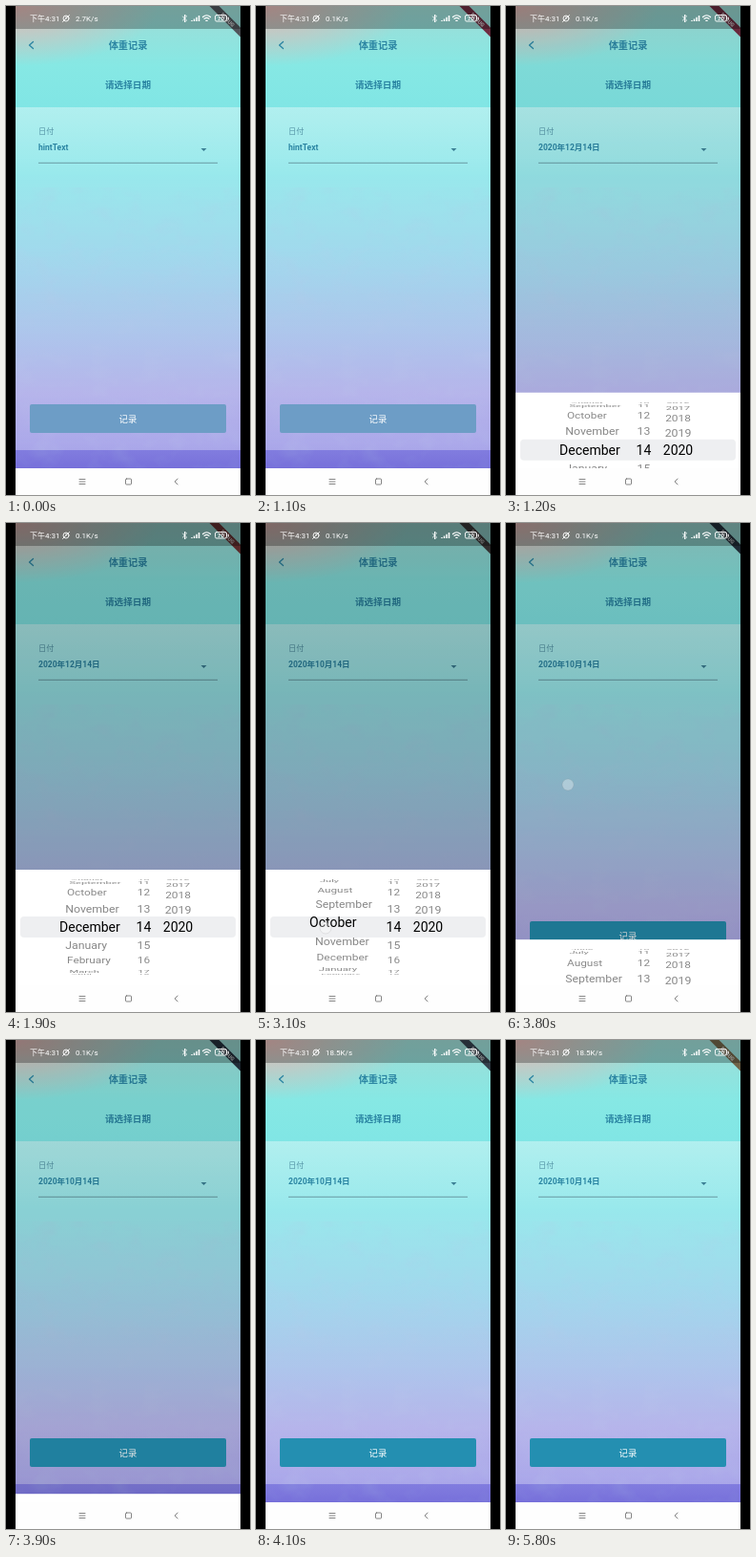
Write an HTML page that moves like this. It is 256 by 512 pixels and loops after 7.7 s.

```html
<!DOCTYPE html>
<html lang="zh">
<head>
<meta charset="utf-8">
<style>
html, body { margin: 0; width: 100%; height: 100%; overflow: hidden; background: #000; }
svg { display: block; width: 100%; height: 100%; font-family: Roboto, "Noto Sans CJK SC", "Noto Sans CJK", sans-serif; }
.mid { text-anchor: middle; }
.line { fill: none; stroke-linecap: round; stroke-linejoin: round; }
.bold { font-weight: 700; fill: #2a84a2; }
</style>
</head>
<body>
<svg viewBox="0 0 256 512">
  <defs>
    <linearGradient id="sky" x1="0" y1="0" x2="0" y2="1">
      <stop offset="0" stop-color="#9fdcd6"/>
      <stop offset=".13" stop-color="#86e8e4"/>
      <stop offset=".36" stop-color="#78e2e6"/>
      <stop offset=".54" stop-color="#80cbe6"/>
      <stop offset=".7" stop-color="#8cb0e4"/>
      <stop offset=".84" stop-color="#9694e2"/>
      <stop offset=".95" stop-color="#8480e0"/>
      <stop offset="1" stop-color="#7770da"/>
    </linearGradient>
    <radialGradient id="blush" gradientUnits="userSpaceOnUse" cx="10" cy="0" r="150" gradientTransform="scale(1 .42)">
      <stop offset="0" stop-color="#e2b8b4"/>
      <stop offset="1" stop-color="#e2b8b4" stop-opacity="0"/>
    </radialGradient>
    <linearGradient id="veil" x1="0" y1="0" x2="0" y2="1">
      <stop offset="0" stop-color="#fff" stop-opacity=".38"/>
      <stop offset=".2" stop-color="#fff" stop-opacity=".24"/>
      <stop offset="1" stop-color="#fff" stop-opacity=".32"/>
    </linearGradient>
    <filter id="paint" x="0" y="0" width="1" height="1">
      <feTurbulence type="fractalNoise" baseFrequency=".035 .05" numOctaves="3" seed="4"/>
      <feColorMatrix values="0 0 0 0 .35  0 0 0 0 .45  0 0 0 0 .75  .9 0 0 0 -.42"/>
    </filter>
    <clipPath id="phone"><path d="M10 0H246V512H10Z"/></clipPath>
    <clipPath id="wheels"><path d="M10 372H246V474H10Z"/></clipPath>
  </defs>
  <rect width="256" height="512"/>
  <g clip-path="url(#phone)">
    <rect x="10" width="236" height="484" fill="url(#sky)"/>
    <rect x="10" width="236" height="100" fill="url(#blush)"/>
    <rect x="10" y="190" width="236" height="294" filter="url(#paint)" opacity=".45"/>
    <rect x="10" y="106" width="236" height="359" fill="url(#veil)"/>

    <path class="line" d="M28.5 37.5L24.5 41L28.5 44.5" stroke="#2a84a2" stroke-width="1.3"/>
    <g class="mid bold">
      <text x="128" y="45" font-size="10.2">体重记录</text>
      <text x="128" y="85.6" font-size="9.6">请选择日期</text>
    </g>
    <text x="34" y="133.6" font-size="8.2" fill="#5594a6">日付</text>
    <text id="date" class="bold" x="34" y="151" font-size="8.5"></text>
    <path d="M34 164.3H222" stroke="#64939c" stroke-width=".9"/>
    <path d="M204.5 149H210.5L207.5 152Z" fill="#3b7f94"/>
    <rect id="button" x="25" y="417" width="206" height="30" rx="2"/>
    <text class="mid" x="128" y="436.2" font-size="9.4" font-weight="500" fill="#fff">记录</text>

    <g id="ribbon">
      <path d="M212.5 -1H222.5L247 23.5V33.5Z"/>
      <text class="mid" transform="translate(232.5 14.5) rotate(45)" y="2" font-size="5.6" font-weight="700" fill="#ddd">DEBUG</text>
    </g>
    <rect x="10" width="236" height="24" fill="#000" fill-opacity=".28"/>
    <rect id="scrim" x="10" width="236" height="484"/>

    <g fill="#fff" font-size="8">
      <text x="25" y="16">下午4:31</text>
      <text id="speed" x="73" y="16"></text>
    </g>
    <g class="line" stroke="#fff" stroke-width=".9">
      <circle cx="63" cy="13" r="3"/>
      <path d="M59.5 16.5L66.5 9.5M63 11V13.3"/>
      <path d="M185.5 11L189.5 15L187.5 17V9L189.5 11L185.5 15"/>
      <path d="M195 15V16M197.5 13.5V16M200 11.8V16M202.5 10V16" stroke-width="1.5" stroke-linecap="butt"/>
      <path d="M206.5 11.5Q210.5 8 214.5 11.5M208 13.4Q210.5 11.2 213 13.4M209.8 15.3H211.2" stroke-width="1.2"/>
      <rect x="219.5" y="9.5" width="12" height="6.5" rx="1.5"/>
      <path d="M233.3 12V13.8"/>
    </g>
    <text class="mid" x="225.5" y="15" font-size="6" font-weight="700" fill="#fff">70</text>

    <g id="sheet">
      <rect x="10" y="363" width="236" height="130" fill="#fff"/>
      <rect x="15" y="412" width="226" height="22" rx="4" fill="#eeeff1"/>
      <g id="items" clip-path="url(#wheels)" font-size="12.5"></g>
    </g>
    <circle id="touch" r="6" fill="#fff" fill-opacity=".33" stroke="#777" stroke-opacity=".15"/>

    <rect x="10" y="484" width="236" height="28" fill="#fefefe"/>
    <g class="line" stroke="#777" stroke-width=".9">
      <path d="M77 495.5H83M77 498H83M77 500.5H83"/>
      <rect x="125.5" y="495" width="6" height="6" rx="1"/>
      <path d="M180 495L177 498L180 501"/>
    </g>
  </g>
</svg>
<script>
const LOOP = 7700, STEP = 100, SLIDE = 335;
const months = ['January', 'February', 'March', 'April', 'May', 'June', 'July',
  'August', 'September', 'October', 'November', 'December'];
const $ = id => document.getElementById(id);
const clamp = v => Math.max(0, Math.min(1, v));
const ease = x => 1 - (1 - clamp(x)) ** 3.4;

// Last value whose start time has passed
const at = (t, list) => list.reduce((v, [start, next]) => t >= start ? next : v, null);

const speeds = [[0, '2.7K/s'], [100, '0.1K/s'], [4100, '18.5K/s']];
const ribbons = [[0, '#50545a'], [100, '#6e2c40'], [1900, '#703434'], [2800, '#403c3c'],
  [3600, '#25323e'], [4100, '#34404c'], [5800, '#706448']];
const monthScroll = [[0, 11], [2900, 10.75], [3000, 10.05], [3100, 9.24], [3200, 9.1], [3300, 9.04], [3400, 9.01], [3500, 9]];
const touches = [[0, null], [2800, [70, 389]], [2900, [71, 395]], [3000, [72, 410]], [3100, [73, 424]],
  [3200, null], [3600, [65, 274]], [3900, null]];

function wheel({ pos, label, center, left, angle = 23 }) {
  let out = '';
  for (let i = Math.ceil(pos - 4); i <= pos + 4; i++) {
    const text = label(i);
    if (!text) continue;
    const turn = (i - pos) * angle * Math.PI / 180;
    const chosen = Math.abs(i - pos) < .5;
    const flat = Math.max(.08, Math.cos(turn));
    const size = chosen ? 1.12 : 1 / (1 + .19 * (1 - flat));
    const x = left ? center + (left - center) * size : center;
    const y = 423 + 49.4 * Math.sin(turn) * (chosen ? 1.12 : 1);
    out += `<text y="4.4" class="${left ? '' : 'mid'}" fill="${chosen ? '#000' : '#888'}"
      transform="translate(${x} ${y}) scale(${size} ${size * flat})">${text}</text>`;
  }
  return out;
}

function draw(t) {
  const opening = (t - 1110) / SLIDE, closing = (t - 3720) / SLIDE;
  const shown = ease(opening) - ease(closing);
  const pos = at(t, monthScroll);
  const picked = t >= 1200;

  $('date').textContent = picked ? `2020年${Math.round(pos) + 1}月14日` : 'hintText';
  $('button').setAttribute('fill', picked ? '#248fb1' : '#6d9dc6');
  $('speed').textContent = at(t, speeds);
  $('ribbon').setAttribute('fill', at(t, ribbons));
  $('scrim').setAttribute('fill-opacity', .22 * (clamp(opening) - clamp(closing)));
  $('sheet').setAttribute('transform', `translate(0 ${121 * (1 - shown)})`);
  $('items').innerHTML =
    wheel({ pos, label: i => months[(i + 12) % 12], center: 107, left: 61.5 }) +
    wheel({ pos: 14, label: i => i, center: 144.4 }) +
    wheel({ pos: 2020, label: i => i <= 2020 && i, center: 180.5, angle: 21 });

  const touch = at(t, touches);
  $('touch').setAttribute('visibility', touch ? 'visible' : 'hidden');
  if (touch) $('touch').setAttribute('transform', `translate(${touch})`);
}

let last = -1;
function tick() {
  const t = Math.floor(performance.now() % LOOP / STEP) * STEP;
  if (t !== last) draw(last = t);
  requestAnimationFrame(tick);
}
tick();
</script>
</body>
</html>
```
